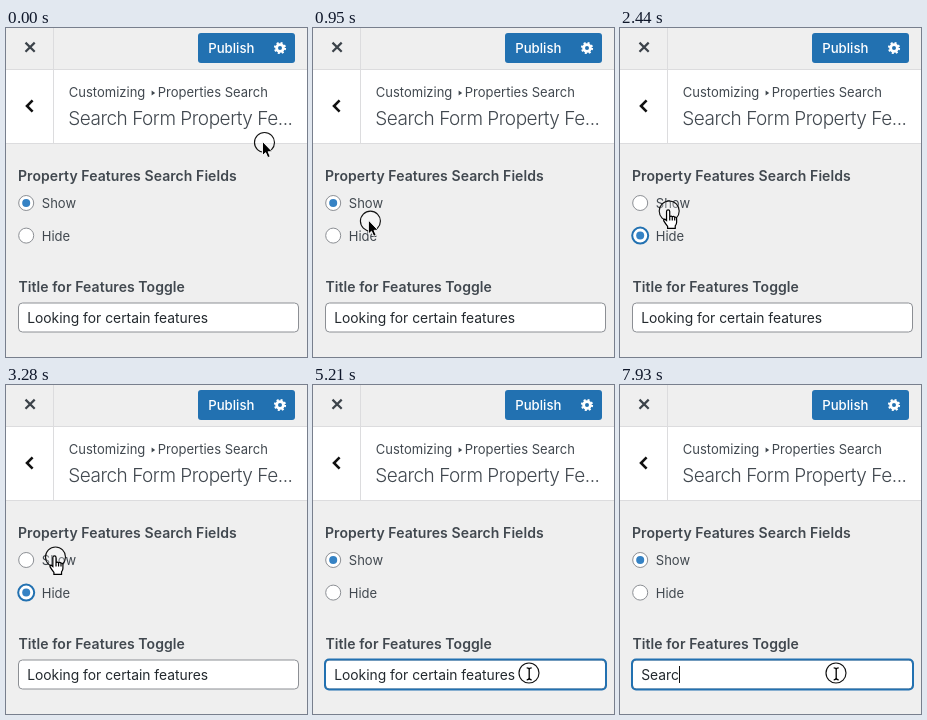
Write an HTML page that moves like this. It is 301 by 329 pixels and loops after 8 s.

```html
<!DOCTYPE html>
<html lang="en">
<head>
<meta charset="utf-8">
<title>Customizer panel</title>
<style>
html, body { margin: 0; width: 100%; height: 100%; overflow: hidden; background: #efefef; }
svg { display: block; width: 301px; height: 329px; }
text { font-family: Inter, Roboto, sans-serif; font-size: 13px; fill: #41484f; white-space: pre; }
.head { font-size: 14px; font-weight: 600; letter-spacing: .075px; }
.title { font-size: 19px; font-weight: 300; letter-spacing: -.48px; }
.save { font-size: 13.2px; font-weight: 500; fill: #fff; }
.value { font-size: 13.83px; fill: #23292e; }
</style>
</head>
<body>
<svg viewBox="0 0 301 329">
  <rect width="301" height="329" fill="#efefef"/>
  <rect y="42" width="301" height="73" fill="#fff"/>
  <path d="M0 41.5H301M0 115.5H301M47.5 0V115" stroke="#dcdcde"/>
  <path d="M19.5 14.6l9.2 9.2M28.7 14.6l-9.2 9.2" stroke="#3c434a" stroke-width="2.2"/>
  <path d="M26.6 72.4L21 78l5.6 5.6" fill="none" stroke="#111" stroke-width="2.6"/>

  <rect x="192" y="5" width="97" height="30" rx="3" fill="#2271b1"/>
  <text class="save" x="202.2" y="25">Publish</text>
  <g fill="none" stroke="#fff">
    <circle cx="274" cy="20" r="3.4" stroke-width="2.8"/>
    <circle cx="274" cy="20" r="5" stroke-width="2.2" stroke-dasharray="1.963"/>
  </g>

  <text x="62.8" y="69">Customizing</text>
  <path d="M145.6 62.6l3.6 2.4-3.6 2.4z" fill="#41484f"/>
  <text x="151.8" y="69">Properties Search</text>
  <text class="title" x="62.2" y="97">Search Form Property Fe...</text>

  <text class="head" x="12" y="152.5">Property Features Search Fields</text>
  <g id="show" transform="translate(20.2 175)"><circle/><circle r="4" fill="#3582c4"/></g>
  <text x="35.8" y="180">Show</text>
  <g id="hide" transform="translate(20.2 207.6)"><circle/><circle r="4" fill="#3582c4"/></g>
  <text x="35.8" y="212.5">Hide</text>

  <text class="head" x="12.4" y="264">Title for Features Toggle</text>
  <rect x="12.5" y="275" width="280" height="29" rx="4" fill="#fff" stroke="#8c8f94"/>
  <rect id="focus" x="12" y="274.5" width="281" height="30" rx="4" fill="none" stroke="#2271b1" stroke-width="2"/>
  <rect id="selection" x="21" y="281" width="181" height="17" fill="#b3d7ff"/>
  <text id="value" class="value" x="21.2" y="295"></text>
  <rect id="caret" y="281" width="1" height="17" fill="#111"/>

  <g id="pointer">
    <circle r="10" fill="#fff" fill-opacity=".3" stroke="#111" stroke-width="1.15"/>
    <path id="arrow" d="M-2-1v14l3.1-2.9 2.2 5 2.4-1-2.1-4.9h4.2z" fill="#000" stroke="#fff" stroke-width=".9"/>
    <path id="hand" transform="scale(1.06)" d="M-2.5 9V.5a1.5 1.5 0 0 1 3 0V5.5q1.3-1.2 2.4 0 1.4-.9 2.3.4 1.8-.5 1.8 1.4V10.5q0 2-1.3 3.5V16.4H-1.5V14.5q-2-2.5-3.6-5.2-.5-1.6 1-1.6zM.5 5.5V9M2.9 5.5V9M5.2 5.9V9" fill="#fff" stroke="#000" stroke-width="1.15"/>
    <path id="beam" transform="translate(.2 .8)" d="M-2.5-6Q0-6 0-4V4Q0 6-2.5 6M2.5-6Q0-6 0-4M0 4Q0 6 2.5 6" fill="none" stroke="#000" stroke-width="1.3"/>
  </g>
</svg>
<script>
const LOOP = 8000;
const $ = id => document.getElementById(id);
const clamp = k => Math.max(0, Math.min(1, k));
const smooth = k => k * k * (3 - 2 * k);
const out = k => 1 - (1 - k) ** 3;

// start, end, target x, target y, easing
const moves = [
  [480, 950, 57.5, 193, smooth],
  [950, 1270, 48.3, 205.7, out],
  [2150, 2440, 49.2, 183, smooth],
  [3070, 3280, 49.5, 172, smooth],
  [3930, 4130, 170, 288.3, smooth],
  [4130, 4410, 216, 288, out]
];

// start, field text, caret x (0 = hidden)
const phrase = "Looking for certain features";
const edits = [
  [0, phrase, 0],
  [4680, phrase, 201.5],
  [5210, phrase, 0],
  [6170, "S", 30],
  [6380, "Se", 38],
  [6440, "Se", 0],
  [6770, "", 21],
  [6980, "", 0],
  [7630, "Se", 38],
  [7660, "Sea", 46],
  [7690, "Sear", 51],
  [7930, "Searc", 59]
];

function pointerAt(t) {
  let x = 258.5, y = 114.5;
  for (const [a, b, tx, ty, ease] of moves) {
    const k = ease(clamp((t - a) / (b - a)));
    x += (tx - x) * k;
    y += (ty - y) * k;
  }
  return [x, y];
}

function shape(x, y) {
  if (y > 275) return "beam";
  const onLabel = (y > 167 && y < 185) || (y > 199 && y < 217);
  return x < 71 && onLabel ? "hand" : "arrow";
}

const toggle = (el, on) => el.setAttribute("visibility", on ? "visible" : "hidden");

// Focus ring grows over 60 ms, between times a and b
const glow = (t, a, b) => t >= a && t < b ? clamp((t - a + 30) / 60) : 0;

function radio(id, checked, focus) {
  const [ring, dot] = $(id).children;
  ring.setAttribute("fill", "#fff");
  ring.setAttribute("r", 7.5 + focus / 2);
  ring.setAttribute("stroke", focus ? "#2271b1" : "#8c8f94");
  ring.setAttribute("stroke-width", 1 + focus);
  toggle(dot, checked);
}

function draw(t) {
  const hidden = t >= 1650 && t < 3610;
  radio("show", !hidden, glow(t, 3610, 4650));
  radio("hide", hidden, glow(t, 1650, 3610));
  $("focus").setAttribute("opacity", glow(t, 4650, LOOP));

  const [, text, caret] = edits.filter(e => e[0] <= t).pop();
  $("value").textContent = text;
  $("caret").setAttribute("x", caret);
  toggle($("caret"), caret > 0);
  toggle($("selection"), t >= 5630 && t < 6170);

  const [x, y] = pointerAt(t);
  $("pointer").setAttribute("transform", `translate(${x} ${y})`);
  const kind = shape(x, y);
  for (const id of ["arrow", "hand", "beam"]) toggle($(id), id === kind);
}

const begin = performance.now();
function tick() {
  draw((performance.now() - begin) % LOOP);
  requestAnimationFrame(tick);
}
tick();
</script>
</body>
</html>
```
